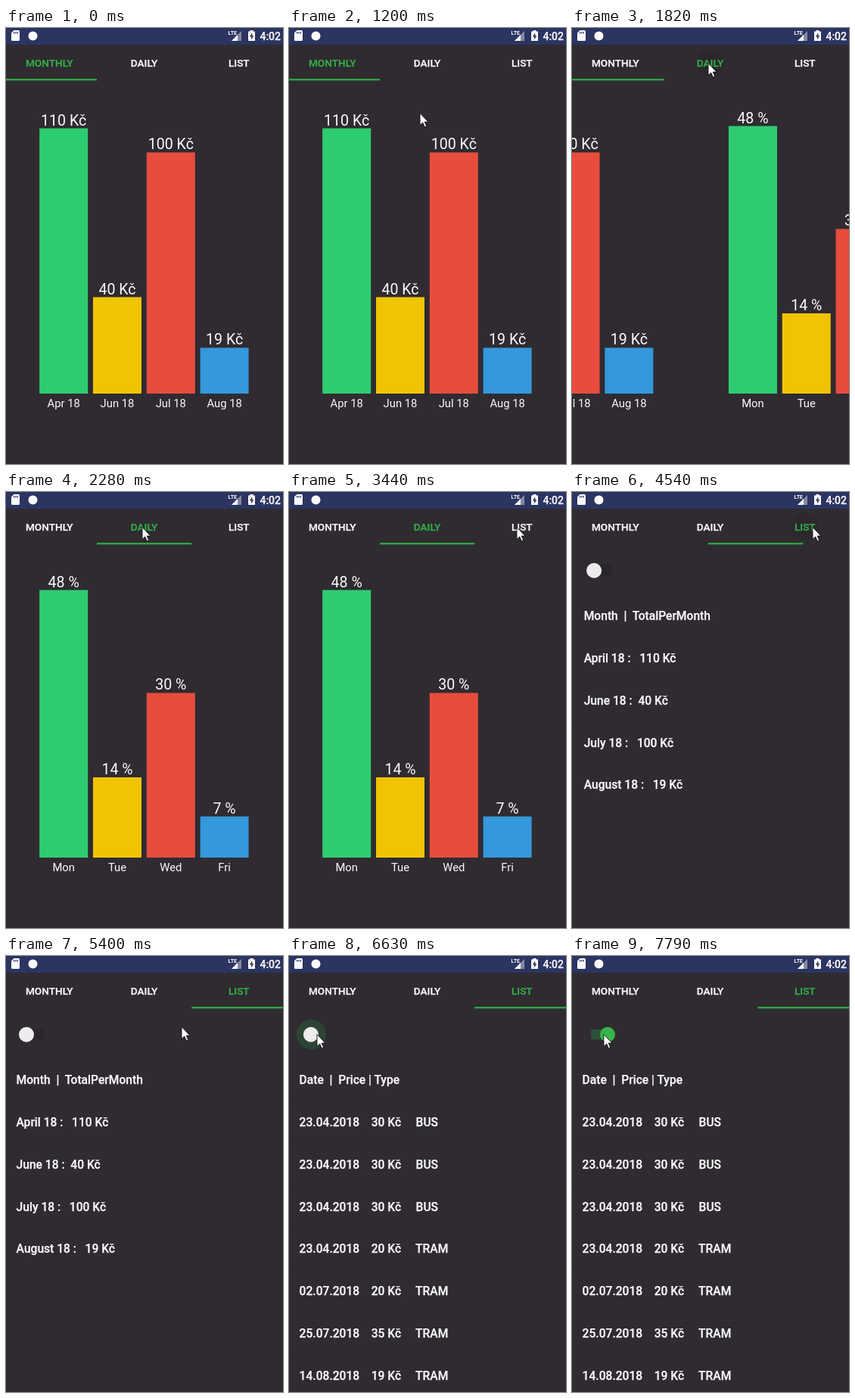
These frames come from a looping animation (366 px wide and 576 px high, 8000 ms). An HTML page:

```html
<!DOCTYPE html>
<html lang="en">
<head>
<meta charset="utf-8">
<title>Fare statistics</title>
<style>
  html, body { margin: 0; width: 100%; height: 100%; overflow: hidden; background: #2f2b31; }
  svg { display: block; width: 366px; height: 576px; font-family: Roboto, sans-serif; fill: #fafafa; color: #fafafa; }
  .value { font-size: 19.6px; text-anchor: middle; }
  .label { font-size: 14.8px; text-anchor: middle; }
  .tab, .row, .clock { font-weight: 500; fill: currentColor; stroke: currentColor; stroke-width: .25px; }
  .tab { font-size: 13.6px; text-anchor: middle; }
  .row { font-size: 15.6px; white-space: pre; }
  .clock { font-size: 13.9px; }
</style>
</head>
<body>
<svg viewBox="0 0 366 576" xmlns="http://www.w3.org/2000/svg">
  <rect width="366" height="576" fill="#2f2b31"/>
  <g id="pages"></g>
  <circle id="tap" cy="46" r="18" fill="#000"/>
  <g id="tabs"></g>
  <rect id="indicator" y="67" width="125.3" height="2.4" fill="#2fa53d"/>
  <g id="status">
    <rect width="366" height="22" fill="#2c3461"/>
    <path d="M10.500 3H16.500Q18 3 18 4.500V15.500Q18 17 16.500 17H8.500Q7 17 7 15.500V6.500Z"/>
    <path d="M10.700 5v2.600M13 5v2.600M15.300 5v2.600" stroke="#2c3461" stroke-width="1.200"/>
    <circle cx="35.500" cy="10.500" r="6"/>
    <path d="M311 4V17H298Z" fill="#858aa4"/>
    <path d="M306 9V17H298Z"/>
    <text x="293.500" y="9.200" font-size="7.200" font-weight="700">LTE</text>
    <path d="M320 4.500H322.500V3H326.500V4.500H329V17H320Z"/>
    <path d="M325.300 6.500L321.800 11.500H324V15.500L327.300 10.200H325.300Z" fill="#2c3461"/>
    <text class="clock" x="335.500" y="15.800">4:02</text>
  </g>
  <path id="cursor" d="M0 .5V16.500L3.700 13L6.300 18.800L8.700 17.800L6.200 12.100H11Z"
        fill="#fff" stroke="#111" stroke-width=".9"/>
</svg>
<script>
const LOOP = 8000, TICK = 77.45, FIRST_TICK = 348;
const PAGE = 376, TAB = 125.3, GREEN = '#31b046';
const TAPS = [1781, 4369], TOGGLE = 6585;
const $ = id => document.getElementById(id);
const tabCenter = i => 57.2 + TAB * i;

function add(parent, tag, attrs = {}, text = '') {
  const el = document.createElementNS('http://www.w3.org/2000/svg', tag);
  set(el, attrs);
  el.textContent = text;
  parent.append(el);
  return el;
}

function set(el, attrs) {
  for (const key in attrs) el.setAttribute(key, attrs[key]);
}

// The tallest bar fills the chart; captions come from the amounts.
function chart(parent, amounts, fullHeight, caption) {
  const colors = ['#2ecc71', '#f0c402', '#e74c3c', '#3498db'];
  const max = Math.max(...Object.values(amounts));
  Object.entries(amounts).forEach(([label, amount], i) => {
    const x = 44.2 + 70.8 * i, height = fullHeight * amount / max, mid = x + 32;
    add(parent, 'rect', { x, y: 483 - height, width: 64, height, fill: colors[i] });
    add(parent, 'text', { class: 'value', x: mid, y: 479 - height }, caption(amount));
    add(parent, 'text', { class: 'label', x: mid, y: 501.3 }, label);
  });
}

function list(parent, rows) {
  const group = add(parent, 'g');
  rows.forEach((row, i) => {
    const y = 168.8 + 55.9 * i;
    if (i) add(group, 'rect', { y: y - 34.2, width: 366, height: 1, fill: '#2d292f' });
    add(group, 'text', { class: 'row', x: 13.6, y }, row);
  });
  return group;
}

const pages = [0, 1, 2].map(i => add($('pages'), 'g', { transform: `translate(${i * PAGE})` }));
const crowns = amount => `${amount} Kč`;
const byMonth = { 'Apr 18': 110, 'Jun 18': 40, 'Jul 18': 100, 'Aug 18': 19 };
const byDay = { Mon: 130, Tue: 39, Wed: 80, Fri: 20 };
const total = Object.values(byDay).reduce((a, b) => a + b);
chart(pages[0], byMonth, 350.5, crowns);
chart(pages[1], byDay, 353.5, amount => `${Math.round(100 * amount / total)} %`);

const monthRows = list(pages[2], ['Month  |  TotalPerMonth', 'April 18 :   110 Kč', 'June 18 :  40 Kč',
  'July 18 :   100 Kč', 'August 18 :   19 Kč']);
const fare = (date, price, type) => `${date}.2018    ${crowns(price)}     ${type}`;
const fareRows = list(pages[2], ['Date  |  Price | Type',
  ...Array(3).fill(fare('23.04', 30, 'BUS')), fare('23.04', 20, 'TRAM'),
  fare('02.07', 20, 'TRAM'), fare('25.07', 35, 'TRAM'), fare('14.08', 19, 'TRAM')]);
const track = add(pages[2], 'rect', { x: 25, y: 97, width: 25, height: 13.5, rx: 3 });
const ripple = add(pages[2], 'circle', { cy: 103.8, r: 19.7, fill: '#2d4434' });
const thumb = add(pages[2], 'circle', { cy: 103.8, r: 10 });
const tabs = ['MONTHLY', 'DAILY', 'LIST'].map((name, i) =>
  add($('tabs'), 'text', { class: 'tab', x: tabCenter(i), y: 50.8 }, name));

// Cursor stops: time, x, y
const stops = [[FIRST_TICK, 275, 565], [1125, 172, 123], [1665, 180, 46], [2350, 180, 46], [3510, 318, 46],
  [4920, 318, 46], [5382, 232, 93], [5770, 94, 98], [6085, 48, 103], [6390, 37, 103],
  [7100, 37, 103], [7780, 42, 103]];

const part = (t, start, length) => Math.min(1, Math.max(0, (t - start) / length));
const smooth = p => p * p * (3 - 2 * p);
const smoother = p => p ** 3 * (p * (6 * p - 15) + 10);
const settle = p => 1 - (1 - p) ** 5;
const sumOverTaps = f => TAPS.reduce((sum, tap) => sum + f(tap), 0);

function cursorAt(t) {
  const next = Math.max(1, stops.findIndex(stop => stop[0] >= t));
  const [from, to] = t > stops.at(-1)[0] ? stops.slice(-2) : stops.slice(next - 1, next + 1);
  const p = part(t, from[0], to[0] - from[0]);
  return [1, 2].map(k => Math.round(from[k] + (to[k] - from[k]) * p));
}

function draw(time) {
  // The screen refreshes in even steps.
  const t = FIRST_TICK + TICK * Math.floor((time - FIRST_TICK) / TICK);

  const scroll = sumOverTaps(tap => settle(part(t, tap, 250)));
  const slide = sumOverTaps(tap => smoother(part(t, tap, 330)));
  const active = TAPS.filter(tap => t > tap).length;
  set($('pages'), { transform: `translate(${-PAGE * scroll})` });
  set($('indicator'), { x: -5.3 + TAB * slide });
  tabs.forEach((tab, i) => { tab.style.color = i === active ? GREEN : ''; });
  set($('tap'), { cx: tabCenter(active), opacity: active ? 0.1 * (1 - part(t, TAPS[active - 1], 400)) : 0 });

  const flip = part(t, TOGGLE, 190), on = flip > 0.5;
  const x = 27 + 20 * smooth(flip);
  monthRows.style.display = flip ? 'none' : '';
  fareRows.style.display = flip ? '' : 'none';
  set(thumb, { cx: x, fill: on ? '#37b54a' : '#ececec' });
  set(track, { fill: on ? '#2e5037' : '#29262b' });
  set(ripple, { cx: x + 0.5, opacity: flip ? 1 - part(t, TOGGLE + 40, 150) : 0 });

  set($('cursor'), { transform: `translate(${cursorAt(t)})`, opacity: t < FIRST_TICK ? 0 : 1 });
}

const begin = performance.now();
function frame() {
  draw((performance.now() - begin) % LOOP);
  requestAnimationFrame(frame);
}
frame();
</script>
</body>
</html>
```
